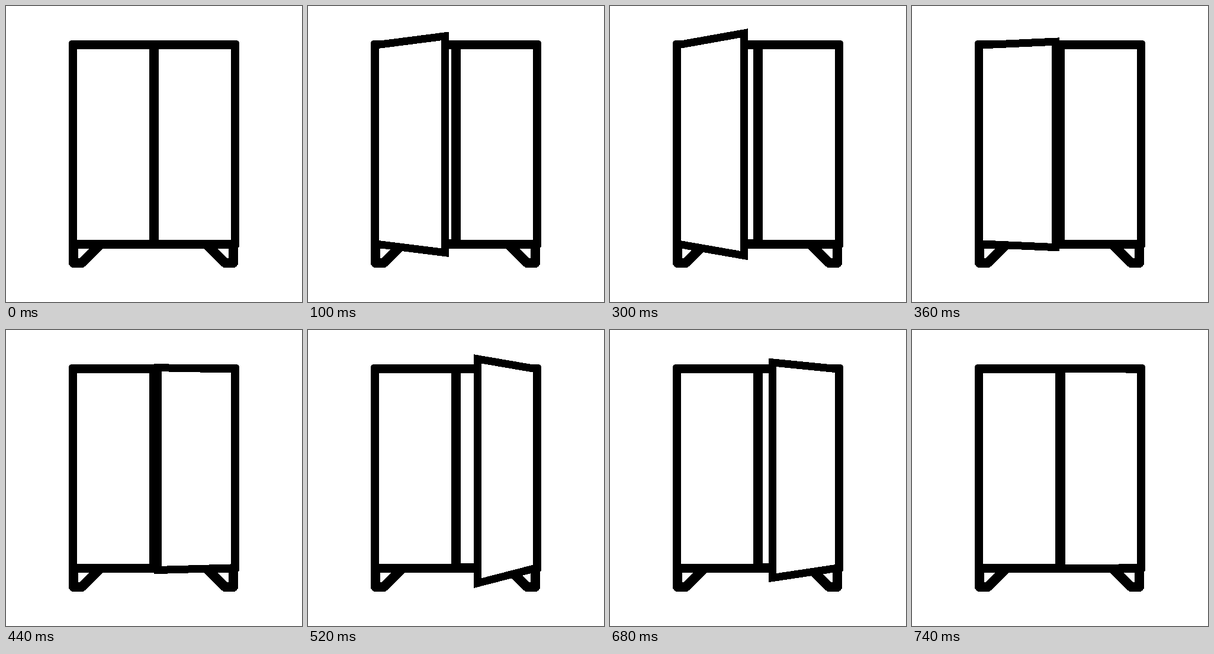
Write an HTML page that moves like this. It is 500 px wide and 500 px high and loops after 0.76 s.

```html
<!DOCTYPE html>
<html lang="en">
<head>
<meta charset="utf-8">
<title>Wardrobe</title>
<style>
  html, body { margin: 0; width: 100%; height: 100%; overflow: hidden; background: #fff; }
  svg { display: block; width: 100%; height: 100%; shape-rendering: crispEdges; }
  .leg { fill: none; stroke: #000; stroke-width: 16; stroke-linejoin: round; }
  .door { fill: #fff; stroke: #000; stroke-width: 13; stroke-linejoin: miter; }
</style>
</head>
<body>
<svg viewBox="0 0 500 500">
  <defs>
    <path id="leg" class="leg" d="M114 402V434H128L160 402"/>
  </defs>
  <use href="#leg"/>
  <use href="#leg" transform="translate(498 0) scale(-1 1)"/>
  <rect x="106" y="58" width="288" height="351.6" rx="5"/>
  <rect x="120" y="73" width="260" height="321" fill="#fff"/>
  <rect x="242" y="65" width="16" height="338"/>
  <polygon class="door" id="left"/>
  <polygon class="door" id="right"/>
</svg>
<script>
  const LOOP = 760, STEP = 20, TOP = 66.1, BOTTOM = 401.8;

  // swing: travel of the free edge; rise and drop: its vertical shift per unit of travel
  const doors = [
    { id: 'left', hinge: 113.5, edge: 248.5, swing: -38.3, rise: .92, drop: .9,
      open: [20, 195], close: [202, 418] },
    { id: 'right', hinge: 386.5, edge: 251.5, swing: 49, rise: .5, drop: .75,
      open: [402, 588], close: [598, 754] }
  ];
  for (const d of doors) d.el = document.getElementById(d.id);

  const ease = (t, [from, to]) => {
    const u = Math.min(1, Math.max(0, (t - from) / (to - from)));
    return (1 - Math.cos(Math.PI * u)) / 2;
  };

  function pose(d, t) {
    const k = ease(t, d.open) - ease(t, d.close);
    const shift = Math.abs(d.swing) * k;
    const x = d.edge + d.swing * k;
    d.el.setAttribute('points', [
      [d.hinge, TOP], [x, TOP - d.rise * shift],
      [x, BOTTOM + d.drop * shift], [d.hinge, BOTTOM]
    ].join(' '));
  }

  function draw() {
    const t = Math.floor(performance.now() % LOOP / STEP) * STEP;
    for (const d of doors) pose(d, t);
    requestAnimationFrame(draw);
  }
  draw();
</script>
</body>
</html>
```
